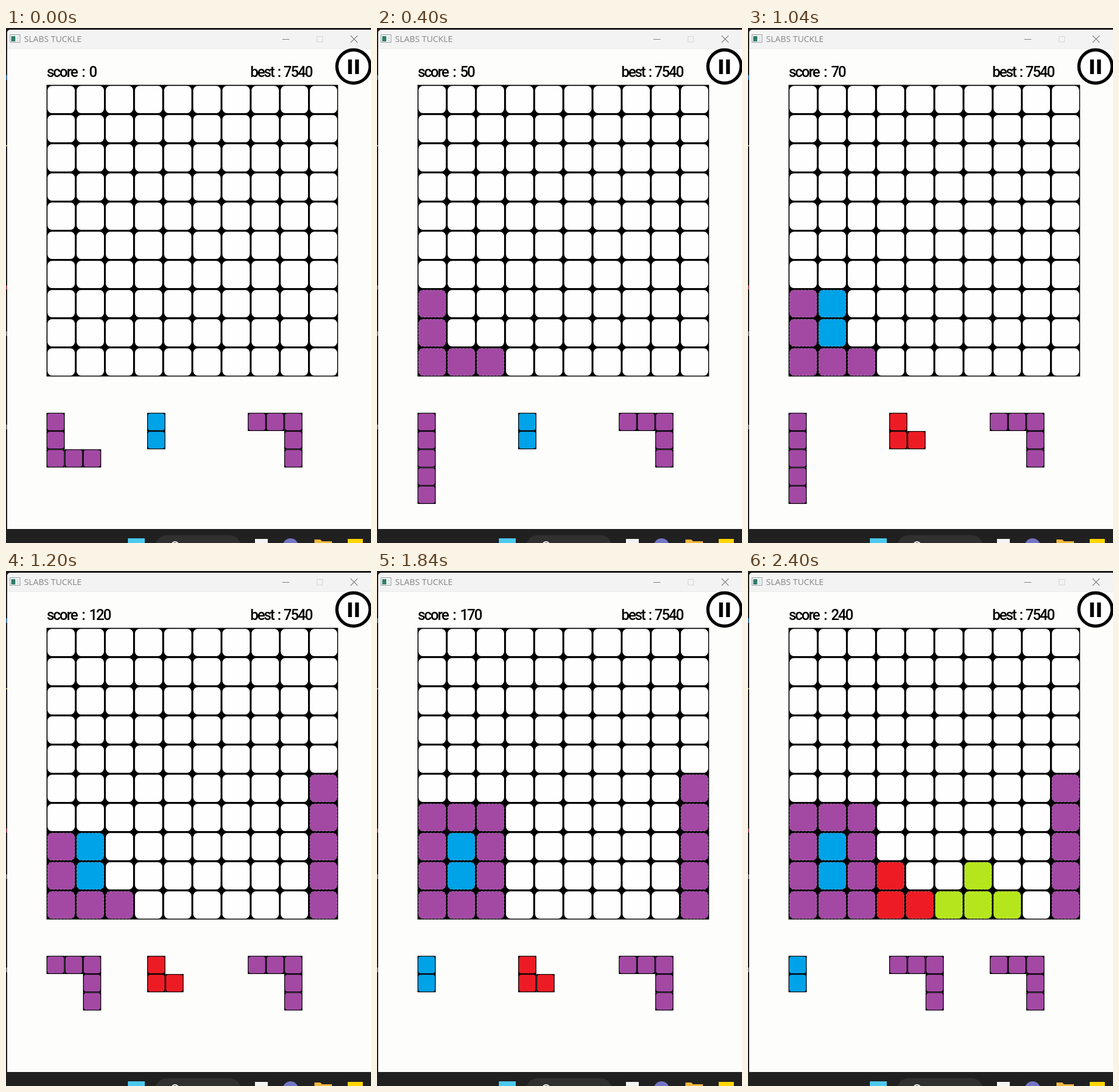
Animation of 626 by 883 pixels, one loop 2800 ms. Source, as an HTML page:

```html
<!DOCTYPE html>
<html lang="en">
<head>
<meta charset="utf-8">
<title>Block game</title>
<style>
  html, body { margin: 0; width: 100%; height: 100%; overflow: hidden; background: #202020; }
  svg { display: block; width: 626px; height: 883px; }
  .title { font: 14.6px "Open Sans", "Noto Sans", sans-serif; fill: #858585; }
  .hud { font: 500 25px Roboto, "Liberation Sans", sans-serif; letter-spacing: -2.1px; word-spacing: 4px; fill: #000; }
  .best { word-spacing: 2px; }
</style>
</head>
<body>
<svg viewBox="0 0 626 883" xmlns="http://www.w3.org/2000/svg">
  <!-- desktop and window -->
  <rect width="626" height="883" fill="#1b191c"/>
  <path d="M0 85h2" stroke="#3f6fb5" stroke-width="8"/>
  <path d="M0 202h2" stroke="#b5a97a" stroke-width="2"/>
  <path d="M0 445h2" stroke="#a04a5c" stroke-width="7"/>
  <path d="M0 524h2M0 684h2" stroke="#77777c" stroke-width="8"/>
  <path d="M2 859V9q0-6 6-6H626V859z" fill="#fdfdfc"/>
  <path d="M2 36V9q0-6 6-6H626V36z" fill="#f3f3f3"/>
  <path d="M2 35.5H626" stroke="#ebebeb"/>

  <!-- title bar -->
  <rect x="7" y="11.5" width="17" height="13" fill="#f7f9fa" stroke="#8f989e"/>
  <rect x="9" y="14" width="7" height="9" fill="#2f7d68"/>
  <path d="M18 15.5h4M18 18.5h4M18 21.5h4" stroke="#b9c3ca"/>
  <text class="title" x="31" y="24">SLABS TUCKLE</text>
  <g fill="none" stroke="#7d7d7d" stroke-width="1.1">
    <path d="M474 19.5h12M591 13l12 12M603 13l-12 12"/>
    <rect x="533.5" y="14.5" width="9.5" height="9.5" stroke="#d6d6d6"/>
  </g>

  <!-- pause button -->
  <circle cx="596" cy="66" r="28.5" fill="#fff" stroke="#000" stroke-width="5.5"/>
  <path d="M590 54v25M602 54v25" stroke="#000" stroke-width="6.5"/>

  <text class="hud" id="score" x="70" y="84"></text>
  <text class="hud best" x="419" y="84">best : 7540</text>
  <g id="board"></g>
  <g id="tray"></g>

  <!-- taskbar -->
  <rect y="859" width="626" height="24" fill="#202020"/>
  <rect x="209" y="875" width="29" height="29" fill="#4cc9ef"/>
  <rect x="256" y="869.5" width="147" height="40" rx="20" fill="#303030"/>
  <circle cx="290" cy="887" r="6" fill="none" stroke="#fff" stroke-width="2"/>
  <rect x="427" y="876" width="22" height="22" fill="#f4f4f4"/>
  <circle cx="488" cy="888.5" r="13.5" fill="#7375c4"/>
  <path d="M529 883v-6h10l3 3h17v3z" fill="#f3b73b"/>
  <rect x="586" y="876" width="26" height="26" fill="#ffd500"/>
</svg>
<script>
const STEP = 400;
const PURPLE = '#a349a4', BLUE = '#00a2e8', RED = '#ed1c24', LIME = '#b5e61d', EMPTY = '#fefefe';

const piece = (color, ...rows) => ({
  color,
  cells: rows.flatMap((row, y) => [...row].flatMap((c, x) => c === '#' ? [[x, y]] : []))
});
const ell = piece(PURPLE, '#', '#', '###');
const hook = piece(PURPLE, '###', '  #', '  #');
const bar = piece(PURPLE, '#', '#', '#', '#', '#');
const pair = piece(BLUE, '#', '#');
const corner = piece(RED, '#', '##');
const tee = piece(LIME, ' # ', '###');

// Each move drops the piece of one tray slot at a column and row, then refills the slot.
const moves = [
  { slot: 0, col: 0, row: 7, next: bar },
  { slot: 1, col: 1, row: 7, next: corner },
  { slot: 0, col: 9, row: 5, next: hook },
  { slot: 0, col: 0, row: 6, next: pair },
  { slot: 1, col: 3, row: 8, next: tee },
  { slot: 1, col: 5, row: 8, next: hook }
];

const rect = (x, y, size, color, radius = 0, extra = '') =>
  `<rect x="${x}" y="${y}" width="${size}" height="${size}" rx="${radius}" fill="${color}" ${extra}/>`;

const glint = 'stroke="#fff" stroke-opacity=".5" stroke-width=".7" stroke-dasharray="3 3"';

function boardCell(color, i) {
  const x = 71.2 + i % 10 * 50, y = 99.2 + Math.floor(i / 10) * 50;
  return rect(x, y, 46.8, color, 7.5, color === EMPTY ? '' : glint);
}

function trayPiece({ color, cells }, slot) {
  const pitch = 31.25;
  return cells.map(([cx, cy]) => {
    const x = 69.5 + slot * 172.6 + cx * pitch, y = 659.8 + cy * pitch;
    return rect(x, y, 31.2, '#000') + rect(x + 1.3, y + 1.3, 28.6, color, 4);
  }).join('');
}

function stateAfter(count) {
  const board = Array(100).fill(EMPTY), tray = [ell, pair, hook];
  let score = 0;
  for (const { slot, col, row, next } of moves.slice(0, count)) {
    const { color, cells } = tray[slot];
    for (const [x, y] of cells) board[(row + y) * 10 + col + x] = color;
    score += cells.length * 10;
    tray[slot] = next;
  }
  return { board, tray, score };
}

const find = id => document.getElementById(id);

function draw(count) {
  const { board, tray, score } = stateAfter(count);
  find('score').textContent = `score : ${score}`;
  find('board').innerHTML = rect(69.5, 97.5, 500, '#000') + board.map(boardCell).join('');
  find('tray').innerHTML = tray.map(trayPiece).join('');
}

const start = performance.now();
let shown = -1;
function tick() {
  const count = Math.floor((performance.now() - start) / STEP) % (moves.length + 1);
  if (count !== shown) draw(shown = count);
  requestAnimationFrame(tick);
}
tick();
</script>
</body>
</html>
```
